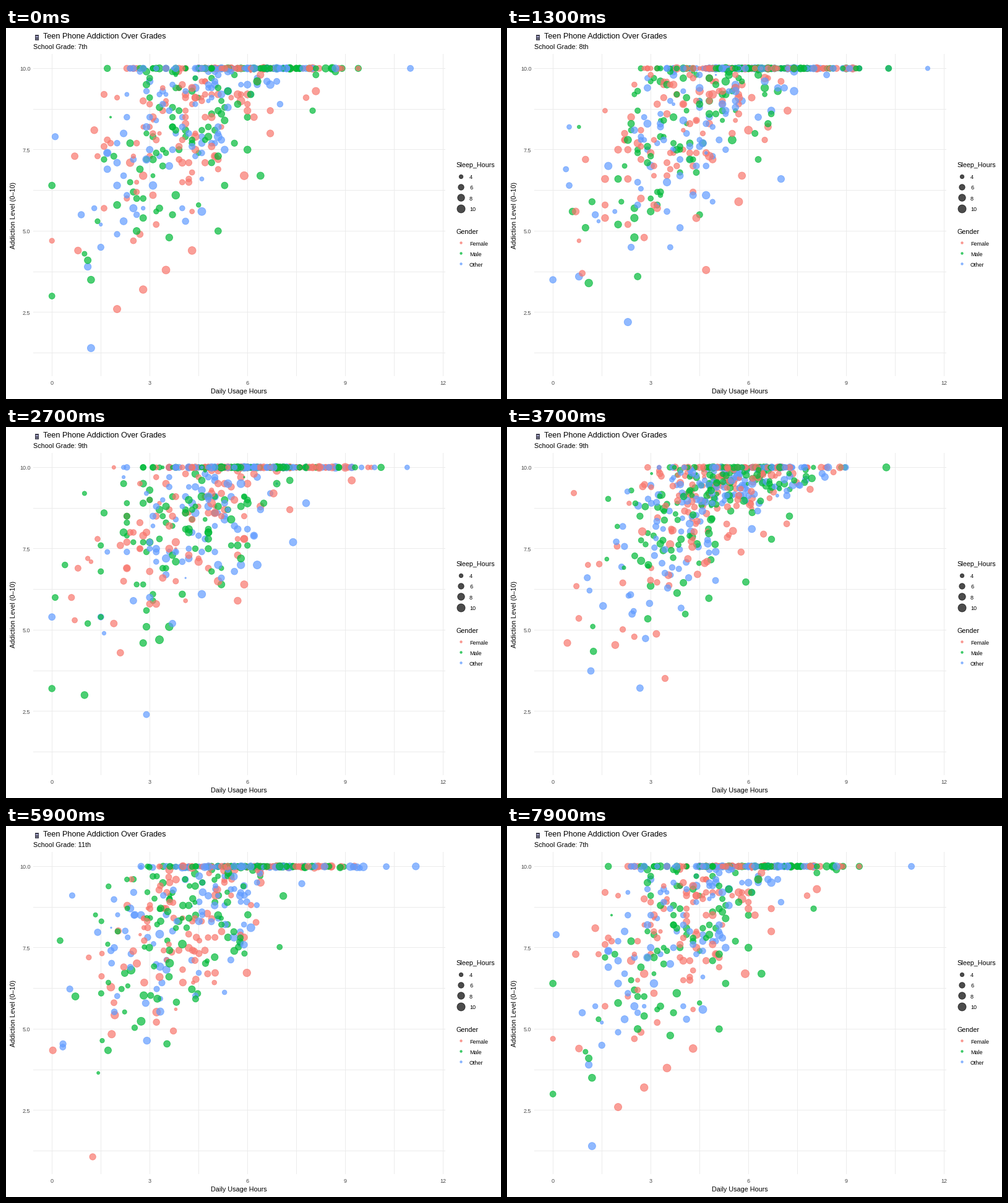
Recreate the animation shown at these times as a matplotlib script. Size 800 px wide and 600 px high, loop 8 s.

```python
import numpy as np
import matplotlib.pyplot as plt
from matplotlib.animation import FuncAnimation
from matplotlib.patches import Rectangle

W, H, DPI = 800, 600, 100
PX = 72 / DPI  # points per pixel
FONT = "Liberation Sans"
COLORS = {"Female": "#F8766D", "Male": "#00BA38", "Other": "#619CFF"}
GRADES = ["7th", "8th", "9th", "10th", "11th", "12th"]
TEENS = 500
ALPHA = 0.7

# Steps from each grade to the next, and the frames held in between
STEPS = [9, 9, 8, 8, 8, 8]
HOLD = 5

# Lowest addiction level and longest usage seen in each grade
LOWEST = [1.4, 2.2, 2.4, 1.4, 1.0, 2.1]
LONGEST = [11.0, 11.5, 10.9, 10.8, 11.2, 10.3]

rng = np.random.default_rng(7)


def to_px(hours):
    return 74.2 + 52.67 * np.asarray(hours)


def to_py(level):
    return 65.3 + 52.6 * (10 - np.asarray(level))


def diameter(sleep):
    """Dot width in pixels; area grows with hours of sleep."""
    size = 1 + 5 * np.sqrt((np.asarray(sleep) - 3) / 7)
    return 0.75 * (2.845 * size + 0.945)


def grade_state(lowest, longest):
    """Long usage and short sleep both raise the level, which is capped at 10."""
    usage = rng.normal(5, 1.95, TEENS)
    sleep = np.clip(rng.normal(6.5, 1.5, TEENS), 3, 10)
    level = 5.3 + 0.9 * usage - 0.35 * (sleep - 6.5) + rng.normal(0, 1.65, TEENS)
    usage = np.clip(usage, 0, longest - 0.6).round(1)
    level = np.clip(level, lowest + 0.6, 10).round(1)
    level[level.argmin()] = lowest
    far = usage.argmax()
    usage[far], level[far] = longest, 10
    return np.column_stack([to_px(usage), to_py(level), diameter(sleep)])


states = [grade_state(*limits) for limits in zip(LOWEST, LONGEST)]
dot_colors = rng.permutation(np.resize(list(COLORS.values()), TEENS))

fig = plt.figure(figsize=(W / DPI, H / DPI), dpi=DPI, facecolor="white")
ax = fig.add_axes([0, 0, 1, 1])
ax.set_xlim(0, W)
ax.set_ylim(H, 0)
ax.axis("off")


def label(x, y, s, px=10.7, color="black", **kw):
    return ax.text(x, y, s, fontsize=px * PX, color=color, family=FONT, **kw)


def areas(width):
    """Marker areas whose outline stays inside the given width."""
    return ((np.asarray(width) - 0.5) * PX) ** 2


def dots(x, y, width, color):
    return ax.scatter(x, y, s=areas(width), c=color, alpha=ALPHA,
                      edgecolors=color, linewidths=0.9 * PX, zorder=3)


def box(x, y, w, h, color, zorder=1):
    ax.add_patch(Rectangle((x, y), w, h, fc=color, ec="none", zorder=zorder))


def grid():
    left, right, top, bottom = 44, 710, 42, 563
    for hours in np.arange(0, 12.1, 1.5):
        box(np.floor(to_px(hours)), top, 1, bottom - top, "#EBEBEB")
    for level in np.arange(1.25, 10.1, 1.25):
        box(left, np.floor(to_py(level)), right - left, 1, "#EBEBEB")
    for hours in range(0, 13, 3):
        label(to_px(hours), 577, str(hours), 9, "#4D4D4D", ha="center")
    for level in (2.5, 5.0, 7.5, 10.0):
        label(39.5, to_py(level) + 4, f"{level:.1f}", 9, "#4D4D4D", ha="right")


def legends():
    label(727, 225, "Sleep_Hours")
    for i, sleep in enumerate((4, 6, 8, 10)):
        y = 239.7 + 17.28 * i
        dots([735], [y], diameter(sleep), "black")
        label(749, y + 4.5, str(sleep), 9)
    label(727, 333, "Gender")
    for i, (name, color) in enumerate(COLORS.items()):
        y = 347.3 + 17 * i
        dots([735], [y], 3.9, color)
        label(749, y + 5, name, 9)


def phone_icon():
    box(47, 11, 6, 9, "#3A3A4A", 2)
    box(48, 13, 4, 2, "#A9A9D0", 3)
    for y in (16, 18):
        box(48, y, 4, 1, "#8C8CA0", 3)


grid()
legends()
phone_icon()
label(59.5, 17, "Teen Phone Addiction Over Grades", 12.6)
subtitle = label(44, 34, "")
label(376.5, 591, "Daily Usage Hours", ha="center")
label(12.5, 303, "Addiction Level (0–10)", rotation=90, ha="center", va="center")
points = dots(states[0][:, 0], states[0][:, 1], states[0][:, 2], dot_colors)


def cubic_in_out(t):
    return 4 * t ** 3 if t < 0.5 else 1 - 4 * (1 - t) ** 3


def locate(frame):
    """Index of the grade being left and the step towards the next one."""
    end = HOLD - 1
    for i, steps in enumerate(STEPS):
        if frame < end + steps:
            return i, max(0, frame - end)
        end += steps + HOLD
    return 0, 0


def update(frame):
    i, step = locate(frame)
    nxt = (i + 1) % len(states)
    t = cubic_in_out(step / STEPS[i])
    now = states[i] + (states[nxt] - states[i]) * t
    points.set_offsets(now[:, :2])
    points.set_sizes(areas(now[:, 2]))
    subtitle.set_text("School Grade: " + GRADES[nxt if step > 5 else i])
    return points, subtitle


anim = FuncAnimation(fig, update, frames=80, interval=100, repeat=True, repeat_delay=0)
plt.show()
```
